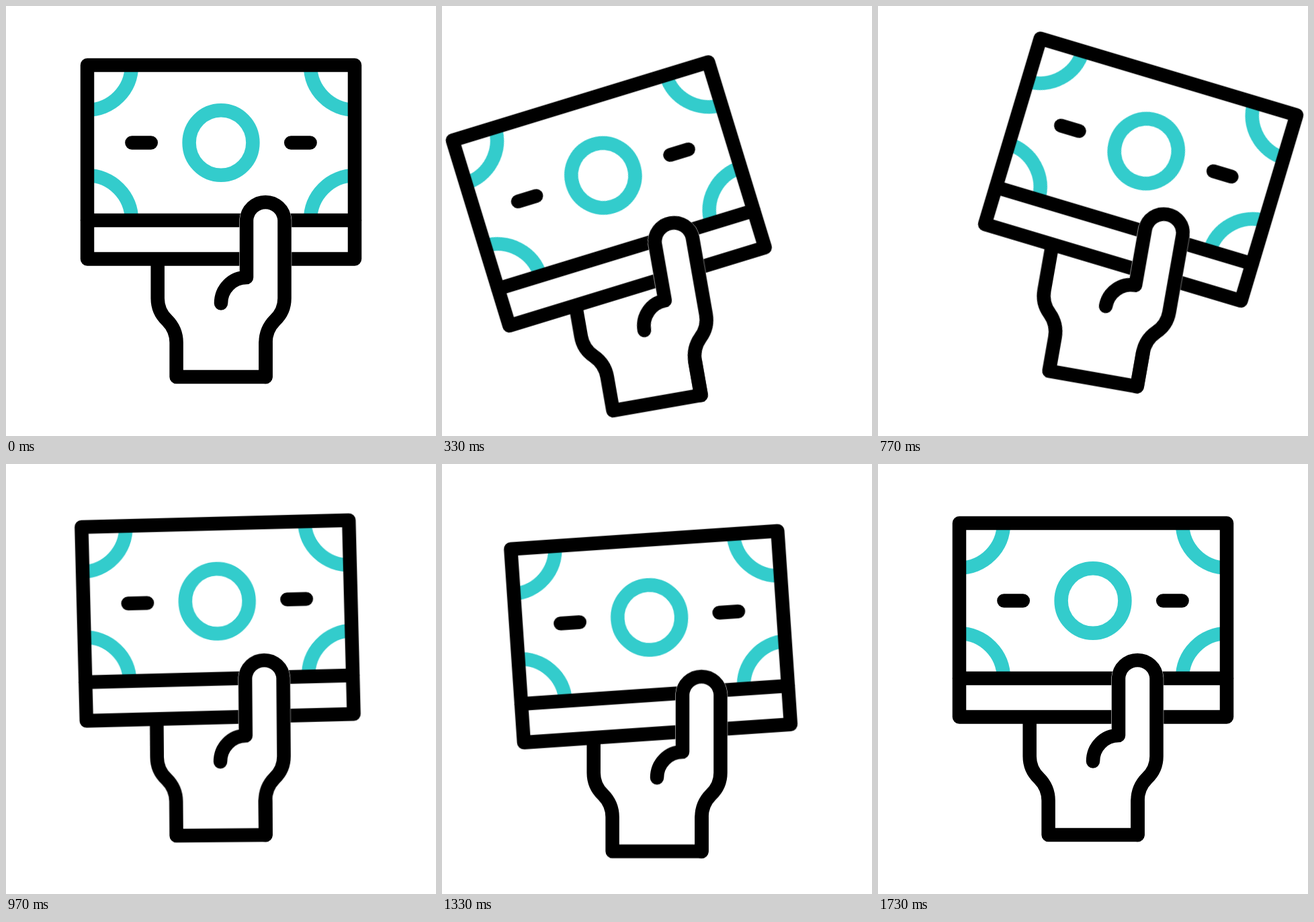
Animation of 640x640 px, one loop 2000 ms. Source, as an HTML page without scripts:

```html
<!DOCTYPE html>
<html lang="en">
<head>
<meta charset="utf-8">
<title>Hand holding cash</title>
<style>
  html, body { margin: 0; width: 100%; height: 100%; overflow: hidden; background: #fff; }
  svg { display: block; width: 100vw; height: 100vh; }

  .ink, .teal { fill: none; stroke: #000; stroke-width: 20.5; stroke-linecap: round; stroke-linejoin: round; }
  .teal { stroke: #3cc; }
  .paper { fill: #fff; }
  .halo { fill: #fff; stroke: #fff; stroke-width: 21.4; }

  .drop, .sway, .bill {
    animation: drop 2s -2ms infinite;
    animation-timing-function: cubic-bezier(.3333, 0, .6667, 1);
  }
  .sway { animation-name: sway; transform-origin: 320px 552px; }
  .bill { animation-name: tilt; transform-origin: 320px 370px; }

  @keyframes drop {
    0%, .83% { transform: translateY(0); }
    21.67% { transform: translateY(45.3px); }
    41.67%, 46.67% { transform: translateY(0); }
    66.67% { transform: translateY(24.5px); }
    86.67%, 100% { transform: translateY(0); }
  }
  @keyframes sway {
    0% { transform: rotate(0deg); }
    18% { transform: rotate(-10.1deg); }
    38.33% { transform: rotate(10deg); }
    55% { transform: rotate(-5.5deg); }
    66.67%, 100% { transform: rotate(0deg); }
  }
  @keyframes tilt {
    0% { transform: rotate(0deg); }
    19.83% { transform: rotate(-7.6deg); }
    39.17% { transform: rotate(6.7deg); }
    59.17% { transform: rotate(-10deg); }
    76.67% { transform: rotate(5.6deg); }
    86.67%, 100% { transform: rotate(0deg); }
  }
</style>
</head>
<body>
<svg viewBox="0 0 640 640">
  <defs>
    <clipPath id="note"><rect x="121" y="88" width="398" height="231"/></clipPath>
  </defs>
  <g class="drop">
    <g class="sway">
      <path class="ink" d="M225.7 350V435C225.7 447 230 458.5 239.5 467.5C248.5 476.5 253.6 488 253.6 501V552H386.5V501"/>

      <g class="bill">
        <rect class="paper" x="121" y="88" width="398" height="288.6"/>
        <g class="teal" clip-path="url(#note)">
          <ellipse cx="121" cy="88" rx="66" ry="66.7"/>
          <ellipse cx="519" cy="88" rx="66" ry="66.7"/>
          <ellipse cx="121" cy="319" rx="66" ry="66.7"/>
          <ellipse cx="519" cy="319" rx="66" ry="66.7"/>
        </g>
        <ellipse class="teal" cx="320" cy="203.5" rx="47.4" ry="48.3"/>
        <g class="ink">
          <path d="M187.4 203.5H215.8M424.2 203.5H452.6M121 319H519"/>
          <rect x="121" y="88" width="398" height="288.6"/>
        </g>
      </g>

      <!-- thumb in front of the bill -->
      <path class="halo" d="M414.5 404V318.5A28.3 28.3 0 0 0 358 318.5V404"/>
      <path class="ink" d="M386.5 552V501C386.5 488 391.5 476.5 400.5 467.5C410 458.5 414.5 447 414.5 435V318.5A28.3 28.3 0 0 0 358 318.5V404C337 404 320 421 320 442.5"/>
    </g>
  </g>
</svg>
</body>
</html>
```
